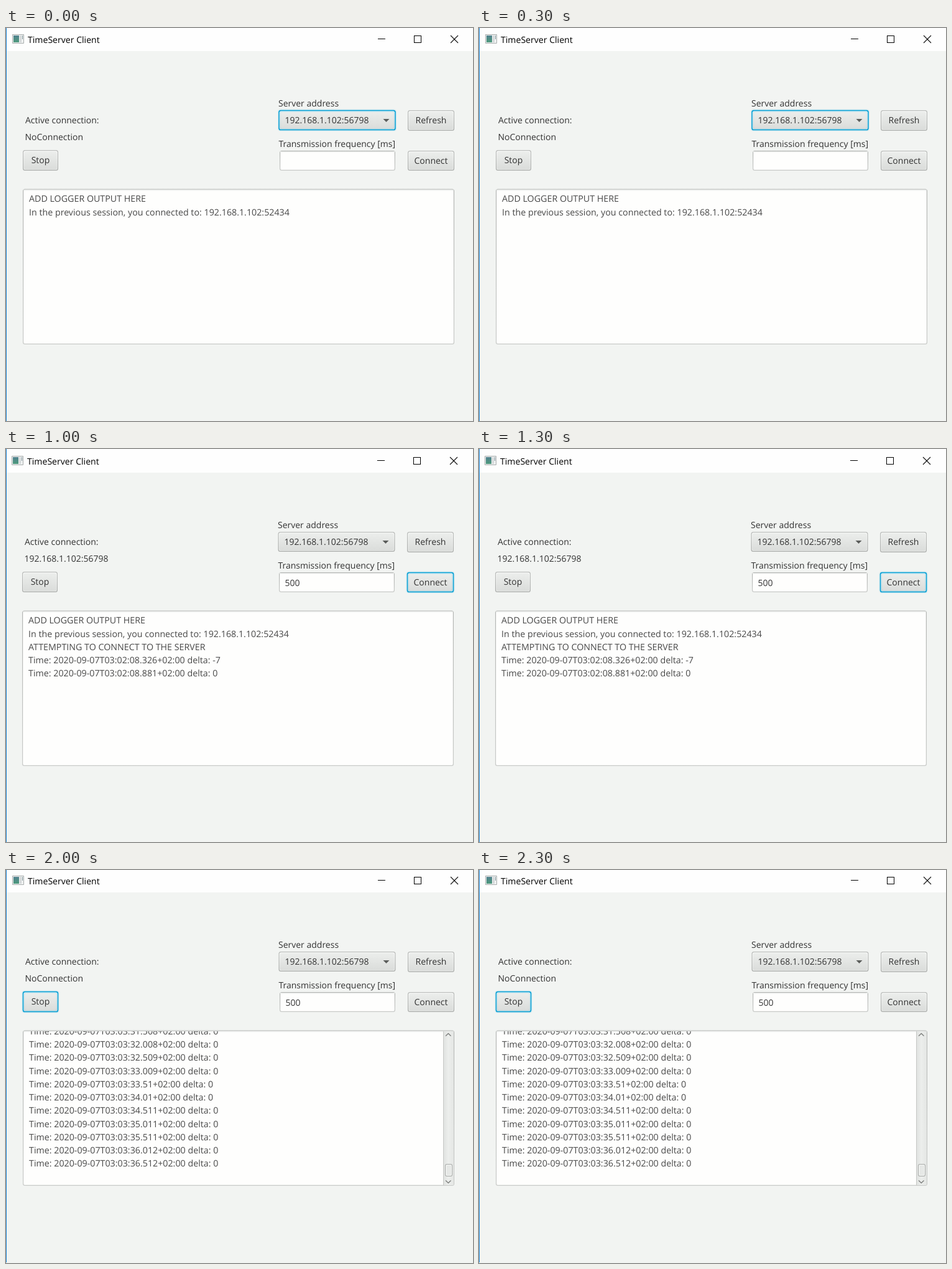
An HTML page with a canvas that plays this animation: 751x631 px, repeating every 2.5 s.

```html
<!DOCTYPE html>
<html lang="en">
<head>
<meta charset="utf-8">
<title>TimeServer Client</title>
<style>
html, body { margin: 0; width: 100%; height: 100%; overflow: hidden; background: #f2f4f2; }
canvas { display: block; }
</style>
</head>
<body>
<canvas id="stage" width="751" height="631"></canvas>
<script>
const W = 751, H = 631, STEP = 500;
const FOCUS = "#039ed3", GLOW = "rgba(3,158,211,.14)";
const ctx = document.getElementById("stage").getContext("2d");

const ADDRESS = "192.168.1.102:56798";
const entry = (time, delta = 0) => `Time: 2020-09-07T03:${time}+02:00 delta: ${delta}`;
const intro = ["ADD LOGGER OUTPUT HERE", "In the previous session, you connected to: 192.168.1.102:52434"];
const attempt = [...intro, "ATTEMPTING TO CONNECT TO THE SERVER", entry("02:08.326", -7), entry("02:08.881")];
const stream = times => times.split(" ").map(time => entry("03:" + time));
const running = stream("06.471 06.972 07.473 07.974 08.474 08.976 09.477 09.977 10.478 10.979 11.479");
const stopped = stream("31.508 32.008 32.509 33.009 33.51 34.01 34.511 35.011 35.511 36.012 36.512");

// x, y: small shifts of the whole window; edge: column of the blue window border
const idle = { x: 0, y: 0, edge: 0, status: "NoConnection", freq: "", focus: "combo", log: intro, logY: 279.3 };
const states = [
  idle,
  { ...idle, freq: "500", focus: "field" },
  { ...idle, x: -1, y: 1, status: ADDRESS, freq: "500", focus: "connect", log: attempt },
  { ...idle, x: -1, edge: 750, status: ADDRESS, freq: "500", focus: "connect", log: running, logY: 264, scroll: true },
  { ...idle, y: -1, freq: "500", focus: "stop", log: stopped, logY: 264.7, scroll: true }
];

function text(str, x, y, { size = 14, color = "#333", align = "left" } = {}) {
  ctx.font = `${size}px "Open Sans", "Noto Sans", sans-serif`;
  ctx.fillStyle = color;
  ctx.textAlign = align;
  ctx.fillText(str, x, y);
}

function box(x, y, w, h, fill, r = 3) {
  ctx.fillStyle = fill;
  ctx.beginPath();
  ctx.roundRect(x, y, w, h, r);
  ctx.fill();
}

function line(color, width, ...points) {
  ctx.strokeStyle = color;
  ctx.lineWidth = width;
  ctx.beginPath();
  points.forEach(([x, y], i) => i ? ctx.lineTo(x, y) : ctx.moveTo(x, y));
  ctx.stroke();
}

function vertical(y, h, ...colors) {
  const g = ctx.createLinearGradient(0, y, 0, y + h);
  colors.forEach((c, i) => g.addColorStop(i / (colors.length - 1), c));
  return g;
}

// Paints one layer of a control, d pixels inside its bounds
const layerOf = (x, y, w, h) => (d, fill) =>
  box(x + d, y + d, w - 2 * d, h - 2 * d, fill, Math.max(1, 3.5 - d / 2));

function raised(x, y, w, h, focused) {
  const layer = layerOf(x, y, w, h);
  const body = vertical(y, h, "#edefed", "#d9dbd9");
  layer(focused ? -0.25 : 0, focused ? FOCUS : vertical(y, h, "#bcbebc", "#acaeac"));
  layer(1.2, vertical(y, h, "#fdfefd", "#e6e8e6"));
  layer(2.2, body);
  if (focused) {
    layer(-1.5, GLOW);
    layer(3, body);
  }
}

function button(label, x, y, w, h, focused) {
  raised(x, y, w, h, focused);
  text(label, x + w / 2, y + 21, { align: "center" });
}

function inset(x, y, w, h, focused) {
  const layer = layerOf(x, y, w, h);
  layer(focused ? -0.25 : 0, focused ? FOCUS : vertical(y, h, "#b3b5b3", "#c8cac8"));
  layer(1.2, "#fefefd");
  if (focused) {
    layer(-1.5, GLOW);
    layer(3, "#fefefd");
  } else {
    box(x + 1, y + 1, w - 2, 1, "#e6e8e6", 0);
    box(x + 1, y + 2, w - 2, 1, "#f6f7f6", 0);
  }
}

function titleBar() {
  box(0, -2, W + 2, 39, "#fefefe", 0);
  box(10, 10, 19, 15, "#a8adad", 1);
  box(11, 11, 17, 13, "#f0f2f2", 0);
  box(12, 12, 9, 11, vertical(12, 11, "#52818f", "#4d9a7c"), 0);
  box(22, 12, 3, 11, "#d5d9da", 0);
  box(26, 12, 1, 6, "#7d9299", 0);
  text("TimeServer Client", 35, 24, { size: 14.1, color: "#000" });
  line("#000", 1, [598, 17.5], [610, 17.5]);
  ctx.strokeRect(656.5, 12.5, 11, 11);
  line("#111", 1.1, [715, 12], [727, 24]);
  line("#111", 1.1, [727, 12], [715, 24]);
}

function scrollBar() {
  const track = ctx.createLinearGradient(703, 0, 720, 0);
  track.addColorStop(0, "#dfe1df");
  track.addColorStop(0.5, "#eceeec");
  track.addColorStop(1, "#e4e6e4");
  box(703, 260, 17, 247, track, [0, 2, 2, 0]);
  box(703, 260, 1, 247, "#c6c8c6", 0);
  box(706, 473, 12, 20, "#a6a8a6");
  box(707, 474, 10, 18, "#f6f8f6", 2);
  box(708, 475, 8, 16, "#e6e8e6", 1);
  line("#7c7e7c", 1.3, [707, 267.5], [711.3, 263.5], [715.5, 267.5]);
  line("#7c7e7c", 1.3, [707, 499.5], [711.3, 503.5], [715.5, 499.5]);
}

function logArea({ log, logY, scroll }) {
  inset(27, 258.5, 694, 249.5);
  ctx.save();
  ctx.beginPath();
  ctx.rect(28, 260, 692, 247);
  ctx.clip();
  log.forEach((str, i) => text(str, 37, logY + 21.27 * i, { size: 14.25, color: "#484848" }));
  ctx.restore();
  if (scroll) scrollBar();
}

function draw(s) {
  ctx.setTransform(1, 0, 0, 1, 0, 0);
  ctx.textRendering = "geometricPrecision";
  box(0, 0, W, H, "#f2f4f2", 0);
  ctx.translate(s.x, s.y);
  titleBar();

  text("Active connection:", 31, 153);
  text(s.status, 30.5, 180);
  button("Stop", 27, 196, 57, 33, s.focus === "stop");

  text("Server address", 438, 126);
  raised(438.5, 132, 188, 32, s.focus === "combo");
  text(ADDRESS, 448.5, 153);
  ctx.fillStyle = "#5b5d5b";
  ctx.beginPath();
  ctx.moveTo(606.5, 146);
  ctx.lineTo(616.5, 146);
  ctx.lineTo(611.5, 151);
  ctx.fill();
  button("Refresh", 646, 132, 75, 33);

  text("Transmission frequency [ms]", 438.5, 191);
  inset(440, 197, 186, 32, s.focus === "field");
  text(s.freq, 449.5, 219);
  button("Connect", 646, 197, 75, 32, s.focus === "connect");

  logArea(s);

  ctx.setTransform(1, 0, 0, 1, 0, 0);
  box(s.edge, s.y - 1, 1, H + 1, "#1883d7", 0);
}

const start = performance.now();
function tick() {
  const elapsed = performance.now() - start;
  draw(states[Math.floor(elapsed / STEP) % states.length]);
  requestAnimationFrame(tick);
}
tick();
</script>
</body>
</html>
```
